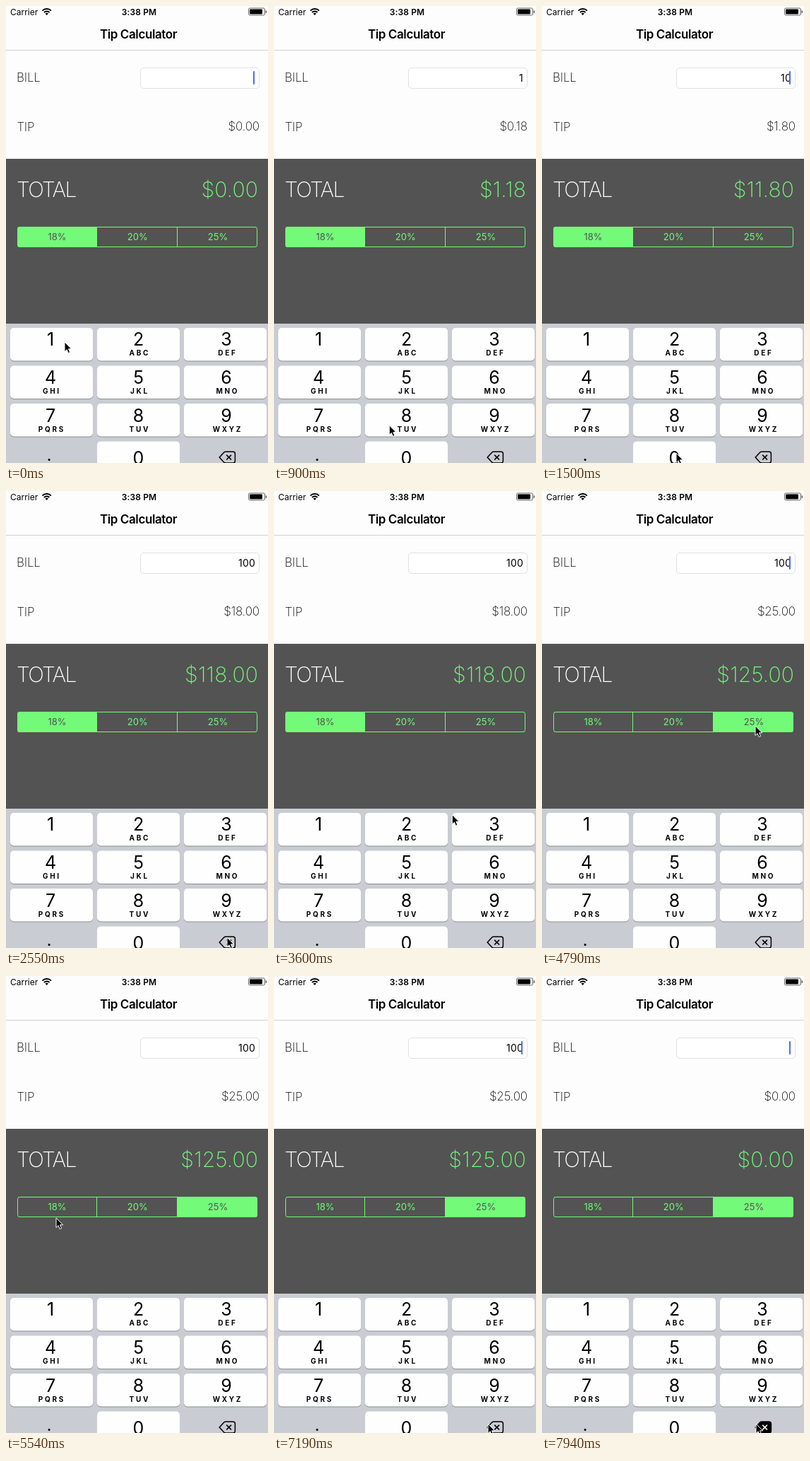
These frames come from a looping animation (371x646 px, 8 s). An HTML page:

```html
<!DOCTYPE html>
<html lang="en">
<head>
<meta charset="utf-8">
<title>Tip Calculator</title>
<style>
  html, body { margin: 0; width: 100%; height: 100%; overflow: hidden; background: #fdfdfd; }
  svg { display: block; width: 371px; height: 646px; }
  text { font-family: Inter, Roboto, sans-serif; fill: #000; white-space: pre; }
  .status { font-size: 12px; }
  .clock { font-size: 12px; font-weight: 600; letter-spacing: .1px; }
  .title { font-size: 17px; font-weight: 600; letter-spacing: -.4px; }
  .label { font-size: 17px; font-weight: 200; letter-spacing: -.2px; }
  .big { font-size: 30px; font-weight: 200; letter-spacing: .2px; fill: #73fa79; }
  .total { letter-spacing: -1.7px; fill: #fff; }
  .field { font-size: 14px; letter-spacing: .2px; }
  .seg { font-size: 13px; }
  .digit { font-size: 25px; }
  .letters { font-size: 10px; font-weight: 700; letter-spacing: 2.7px; }
  .mid { text-anchor: middle; }
  .end { text-anchor: end; }
</style>
</head>
<body>
<svg id="stage" viewBox="0 0 371 646">
  <clipPath id="pill"><rect x="16" y="312" width="340" height="29" rx="3.5"/></clipPath>
</svg>
<script>
const LOOP = 8000, BEAT = 150, GREEN = '#73fa79', DARK = '#535353', WHITE = '#fefefe';
const stage = document.getElementById('stage');

function add(tag, attrs, content) {
  const el = document.createElementNS('http://www.w3.org/2000/svg', tag);
  for (const k in attrs) el.setAttribute(k, attrs[k]);
  if (content) el.textContent = content;
  return stage.appendChild(el);
}
const text = (x, y, cls, str) => add('text', { x, y, class: cls }, str);
const rect = (x, y, width, height, fill, rx = 0, stroke = 'none') =>
  add('rect', { x, y, width, height, fill, rx, stroke });
const line = (d, stroke, width, fill = 'none') =>
  add('path', { d, stroke, 'stroke-width': width, fill });

// Status and title bars
rect(0, 0, 371, 646, '#fdfdfd');
text(6, 13, 'status', 'Carrier');
line('M51.5 6.6a9 9 0 0 1 12.4 0M53.9 9.1a5.6 5.6 0 0 1 7.6 0', '#000', 2);
line('M57.7 13l-2.2-2.3a3.2 3.2 0 0 1 4.4 0z', 'none', 0, '#000');
text(188.5, 13, 'clock mid', '3:38 PM');
rect(343.5, 3, 23, 10, 'none', 2, '#666');
rect(345, 4.5, 18, 7, '#000', 1);
rect(367.6, 6.2, 1.6, 3.8, '#666', .8);
text(187.5, 46, 'title mid', 'Tip Calculator');
rect(0, 62, 371, 1, '#d2d2d2');

// Bill and tip
text(15, 107, 'label', 'BILL');
text(15.4, 177, 'label', 'TIP');
rect(190.5, 87.5, 168, 29, '#fff', 4.5, '#e0e0e0');
const billText = text(353, 107, 'field end');
const caret = rect(350, 92, 2, 19, '#4a6fe3', 1);
const tipText = text(358.8, 176, 'label end');

// Total and rate picker
rect(0, 216, 371, 233, DARK);
text(15, 270, 'big total', 'TOTAL');
const totalText = text(357.2, 270, 'big end');
const segs = [18, 20, 25].map((rate, i) => {
  const box = rect(14.5 + 114 * i, 312, 114, 29, 'none', 0, GREEN);
  box.setAttribute('clip-path', 'url(#pill)');
  return { rate, box, label: text(72.5 + 113.75 * i, 331, 'seg mid', rate + '%') };
});
rect(16.5, 312.5, 339, 28, 'none', 3, GREEN);

// Keypad
rect(0, 449, 371, 197, '#c9ccd2');
function key(col, row) {
  const x = 6 + 123 * col, y = 455 + 53.5 * row;
  rect(x, y + 1, 117, 46.5, '#8b8d92', 5);
  return rect(x, y, 117, 46.5, WHITE, 5);
}
const groups = ['', 'ABC', 'DEF', 'GHI', 'JKL', 'MNO', 'PQRS', 'TUV', 'WXYZ'];
groups.forEach((letters, i) => {
  const col = i % 3, row = Math.floor(i / 3);
  const x = 63.1 + 124.5 * col, y = 480 + 54 * row;
  key(col, row);
  text(x, y, 'digit mid', String(i + 1));
  text(x + 1.8, y + 14, 'letters mid', letters);
});
const zeroKey = key(1, 3);
text(187.5, 648, 'digit mid', '0');
text(61, 643, 'digit mid', '.');
const eraseKey = line('M302.2 638L308.4 631.2Q309.6 630 311.2 630H321.4Q324.4 630 324.4 633V643' +
  'Q324.4 646 321.4 646H311.2Q309.6 646 308.4 644.8Z', '#000', 1.5);
const cross = line('M312.2 634.6l6.8 6.8m0-6.8l-6.8 6.8', '#000', 1.5);

const pointer = line('M0 0V13.6L3.1 10.7L5.2 15.6L7.6 14.6L5.5 9.8H9.7Z', '#fff', 1, '#000');

// What is tapped and when; '<' erases
const tap = (time, name) => ({ time, name });
const typed = [tap(300, '1'), tap(1350, '0'), tap(1650, '0'),
  ...[0, 1, 2].map(i => tap(7340 + 2 * BEAT * i, '<'))];
const picked = [tap(0, 18), tap(3900, 20), tap(4650, 25)];

// Where the pointer travels, resting between trips
const spots = {
  one: [83, 475], zero: [190, 632], erase: [313, 631], edge: [353, 632], back: [338, 633],
  mid: [188, 326], right: [302, 332], left: [71, 342], near: [62, 338], eraseTip: [303, 633]
};
const trips = [
  [450, 1050, 'zero'], [1950, 2550, 'erase'], [2550, 2700, 'edge'], [2700, 3000, 'back'],
  [3000, 4050, 'mid'], [4050, 4790, 'right'], [4790, 5540, 'left'], [5540, 5840, 'near'],
  [5990, 6440, 'right'], [6590, 6890, 'eraseTip']
];

const money = v => '$' + v.toFixed(2);
const upTo = (taps, t) => taps.filter(p => p.time <= t);

// The screen refreshes in beats; one beat before 4790 ms is cut short.
function beat(t) {
  const from = t < 4790 ? 0 : 4790;
  return from + Math.floor((t - from) / BEAT) * BEAT;
}

function place(t) {
  let [x, y] = spots.one;
  for (const [from, to, name] of trips) {
    const k = Math.min(1, Math.max(0, (t - from) / (to - from)));
    x += (spots[name][0] - x) * k;
    y += (spots[name][1] - y) * k;
  }
  return [x, y];
}

function draw(now) {
  const t = beat(now);
  const done = upTo(typed, t), last = done.at(-1) || tap(0, '');
  const entry = done.reduce((s, p) => p.name === '<' ? s.slice(0, -1) : s + p.name, '');
  const held = t - last.time < BEAT ? last.name : '';
  const rate = upTo(picked, t).at(-1).name;
  const bill = Number(entry), tip = bill * rate / 100;

  billText.textContent = entry;
  tipText.textContent = money(tip);
  totalText.textContent = money(bill + tip);
  caret.setAttribute('opacity', (t - last.time) % 1040 < 590 ? 1 : 0);
  for (const s of segs) {
    s.box.setAttribute('fill', s.rate === rate ? GREEN : 'none');
    s.label.style.fill = s.rate === rate ? DARK : GREEN;
  }
  zeroKey.setAttribute('fill', held === '0' ? '#b4b9c2' : WHITE);
  eraseKey.setAttribute('fill', held === '<' ? '#000' : 'none');
  cross.setAttribute('stroke', held === '<' ? '#fff' : '#000');
  pointer.setAttribute('transform', `translate(${place(t)})`);
}

const start = performance.now();
function tick() {
  draw((performance.now() - start) % LOOP);
  requestAnimationFrame(tick);
}
tick();
</script>
</body>
</html>
```
